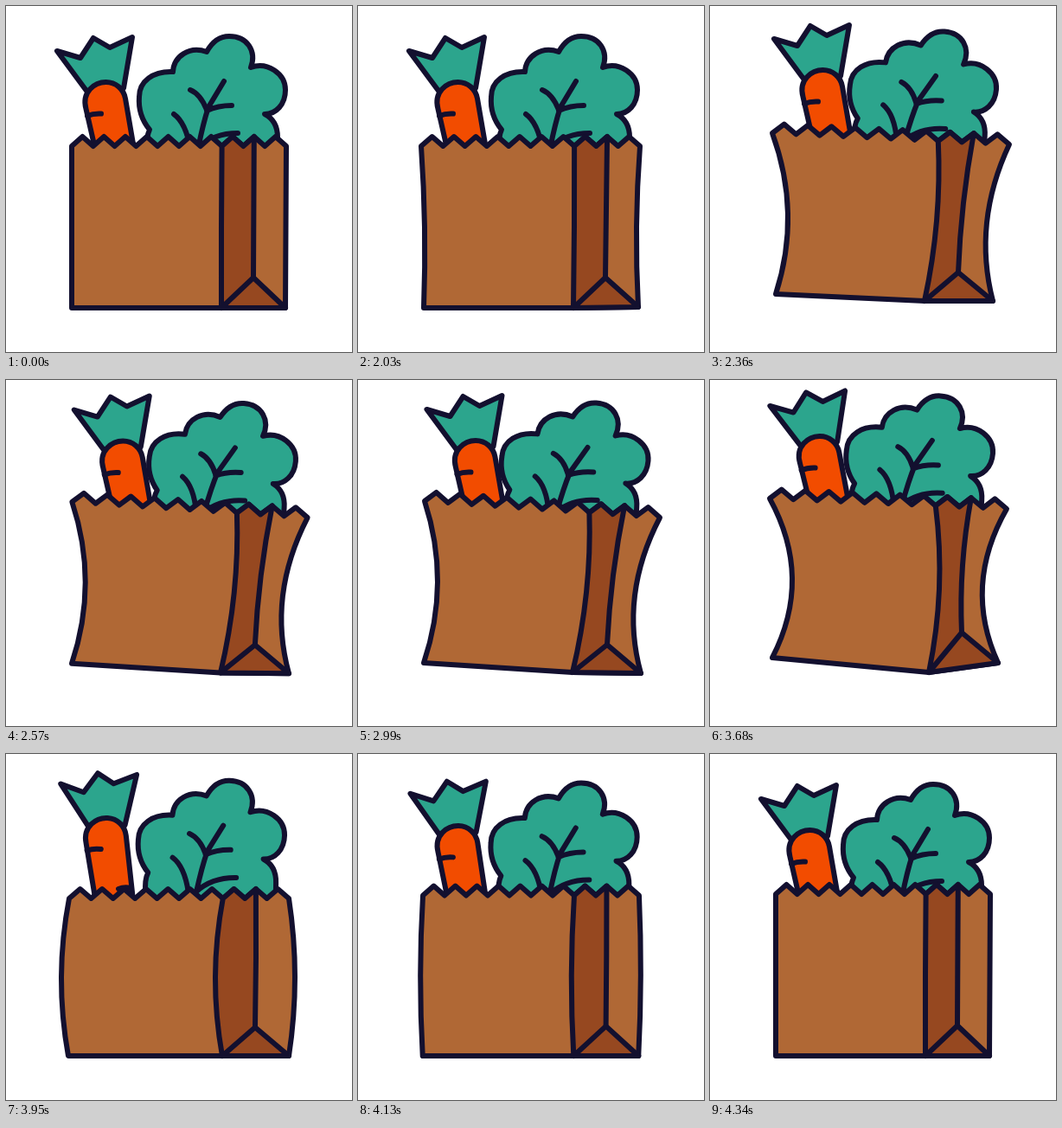
Recreate the animation shown at these times as an HTML page with a canvas. Size 400 px wide and 400 px high, loop 4.37 s.

```html
<!DOCTYPE html>
<html lang="en">
<head>
<meta charset="utf-8">
<title>Grocery bag</title>
<style>
  html, body { margin: 0; height: 100%; overflow: hidden; background: #fff; }
  canvas { display: block; }
</style>
</head>
<body>
<canvas id="stage" width="400" height="400"></canvas>
<script>
const ctx = document.getElementById('stage').getContext('2d');
const LOOP = 4370, START = 2030, STEP = 30;
const INK = '#13102f', GREEN = '#2ca58d', ORANGE = '#f24c00', BROWN = '#b06835', DARK = '#964820';

// Pose: rim left, rim right, base left, base fold, base right, gusset tip (x, y each),
// mid x of left, fold, inner and right edges, then carrot and broccoli (dx, dy, degrees).
const rest    = [76,162, 324,162, 76,349, 249,349, 323,349, 286,314, 76,249,286.5,323.5, 0,0,0, 0,0,0];
const nudge   = [73,162, 326,162, 76,349, 249,349, 324,348, 286,314, 77,250,287,322, 0,0,0, 0,0,0];
const lift    = [72,147, 346,160, 76,333, 248,341, 327,341, 287,308, 90,262,293,320, 15,-14,0, 8,-7,4.5];
const hold    = [77,140, 349,159, 76,327, 248,338, 327,339, 288,306, 92,264,295,320, 20.5,-18,0, 12.5,-10,4.5];
const leap    = [69,137, 343,149, 72,321, 253,338, 333,327, 291,292, 95,265,292,315, 11,-23,-1, 4,-18,4];
const landing = [73,167, 327,167, 72,349, 250,349, 327,349, 288,316, 64,242,289,334, 2,-14,3.5, -1,-4.5,1];

const BAG_VALUES = 16;
const mix = (a, b, bag, food = bag) =>
  a.map((v, i) => v + (b[i] - v) * (i < BAG_VALUES ? bag : food));

const keys = [
  [2000, rest], [2030, nudge], [2360, lift], [2540, mix(lift, hold, .85)],
  [2990, hold], [3080, hold], [3620, mix(hold, leap, .85)], [3680, leap],
  [3750, mix(hold, leap, 2)], [3950, landing], [4010, mix(rest, landing, 1.9, .5)],
  [4180, mix(rest, landing, -.1, .3)], [4340, rest]
];

// Monotone cubic interpolation between keys.
function slope(k, i) {
  if (k < 0 || k >= keys.length - 1) return 0;
  return (keys[k + 1][1][i] - keys[k][1][i]) / (keys[k + 1][0] - keys[k][0]);
}
function tangent(k, i) {
  const a = slope(k - 1, i), b = slope(k, i);
  return a * b <= 0 ? 0 : 2 * a * b / (a + b);
}
function poseAt(t) {
  if (t < START || t >= 4340) return rest;
  const k = keys.findIndex(key => key[0] > t) - 1;
  const [t0, a] = keys[k], [t1, b] = keys[k + 1];
  const h = t1 - t0, u = (t - t0) / h, w = 1 - u;
  return a.map((v, i) =>
    v * (1 + 2 * u) * w * w + b[i] * u * u * (3 - 2 * u) +
    h * u * w * (tangent(k, i) * w - tangent(k + 1, i) * u));
}

const leaves = new Path2D('M59 52L86 60L101 37L120 48L146 36L136 95L93 98Z');
const root = new Path2D('M111 200L92.5 119C87 99 103 88 115.5 88C127 88 136 96 138 107L154 200');
const rootLines = new Path2D('M94 127Q101 124 110 124.5M133 169Q139 166 147 167');
const crown = new Path2D('M170 200C164 175 160 155 166 143C157 132 153 118 154 105C154 87 170 75 193 76' +
  'C194 58 212 46 232 53C238 42 246 35 258 35C279 35 290 52 283 71C302 64 323 78 323 97' +
  'C323 114 312 125 299 125C309 130 314 140 314 152L314 200');
const veins = new Path2D('M252 87L234 117Q228 135 222 165M232 121Q245 115 261 115' +
  'M213 97Q225 102 232 120M194 125Q208 135 213 165M222 164Q240 147 268 147');

function shape(path, fill) {
  if (fill) { ctx.fillStyle = fill; ctx.fill(path); }
  ctx.stroke(path);
}

function placed(px, py, dx, dy, degrees, draw) {
  ctx.save();
  ctx.translate(px + dx, py + dy);
  ctx.rotate(degrees * Math.PI / 180);
  ctx.translate(-px, -py);
  draw();
  ctx.restore();
}

function drawBag(p) {
  const [lx, ly, rx, ry, blx, bly, fx, fy, brx, bry, vx, vy, midL, midF, midI, midR] = p;
  const rim = i => [lx + (rx - lx) * i / 20, ly + (ry - ly) * i / 20 - (i % 2 ? 11 : 0)];
  const zigzag = (path, from, to) => { for (let i = from; i <= to; i++) path.lineTo(...rim(i)); };
  const bend = (path, [ax, ay], [bx, by], mid) =>
    path.quadraticCurveTo(2 * mid - (ax + bx) / 2, (ay + by) / 2, bx, by);
  const baseL = [blx, bly], fold = [fx, fy], baseR = [brx, bry], tip = [vx, vy];

  const body = new Path2D();
  zigzag(body, 0, 20);
  bend(body, rim(20), baseR, midR);
  body.lineTo(...fold);
  body.lineTo(...baseL);
  bend(body, baseL, rim(0), midL);
  body.closePath();

  const side = new Path2D();
  zigzag(side, 14, 17);
  bend(side, rim(17), tip, midI);
  side.lineTo(...baseR);
  side.lineTo(...fold);
  bend(side, fold, rim(14), midF);
  side.closePath();

  const crease = new Path2D();
  crease.moveTo(...tip);
  crease.lineTo(...fold);

  shape(body, BROWN);
  shape(side, DARK);
  shape(crease);
}

function draw(p) {
  ctx.fillStyle = '#fff';
  ctx.fillRect(0, 0, 400, 400);
  ctx.strokeStyle = INK;
  ctx.lineWidth = 6;
  ctx.lineCap = ctx.lineJoin = 'round';
  placed(240, 100, p[19], p[20], p[21], () => {
    shape(crown, GREEN);
    shape(veins);
  });
  placed(116, 88, p[16], p[17], p[18], () => {
    shape(leaves, GREEN);
    shape(root, ORANGE);
    shape(rootLines);
  });
  drawBag(p);
}

const begin = performance.now();
function tick() {
  const t = (performance.now() - begin) % LOOP;
  draw(poseAt(t < START ? 0 : START + Math.floor((t - START) / STEP) * STEP));
  requestAnimationFrame(tick);
}
tick();
</script>
</body>
</html>
```
